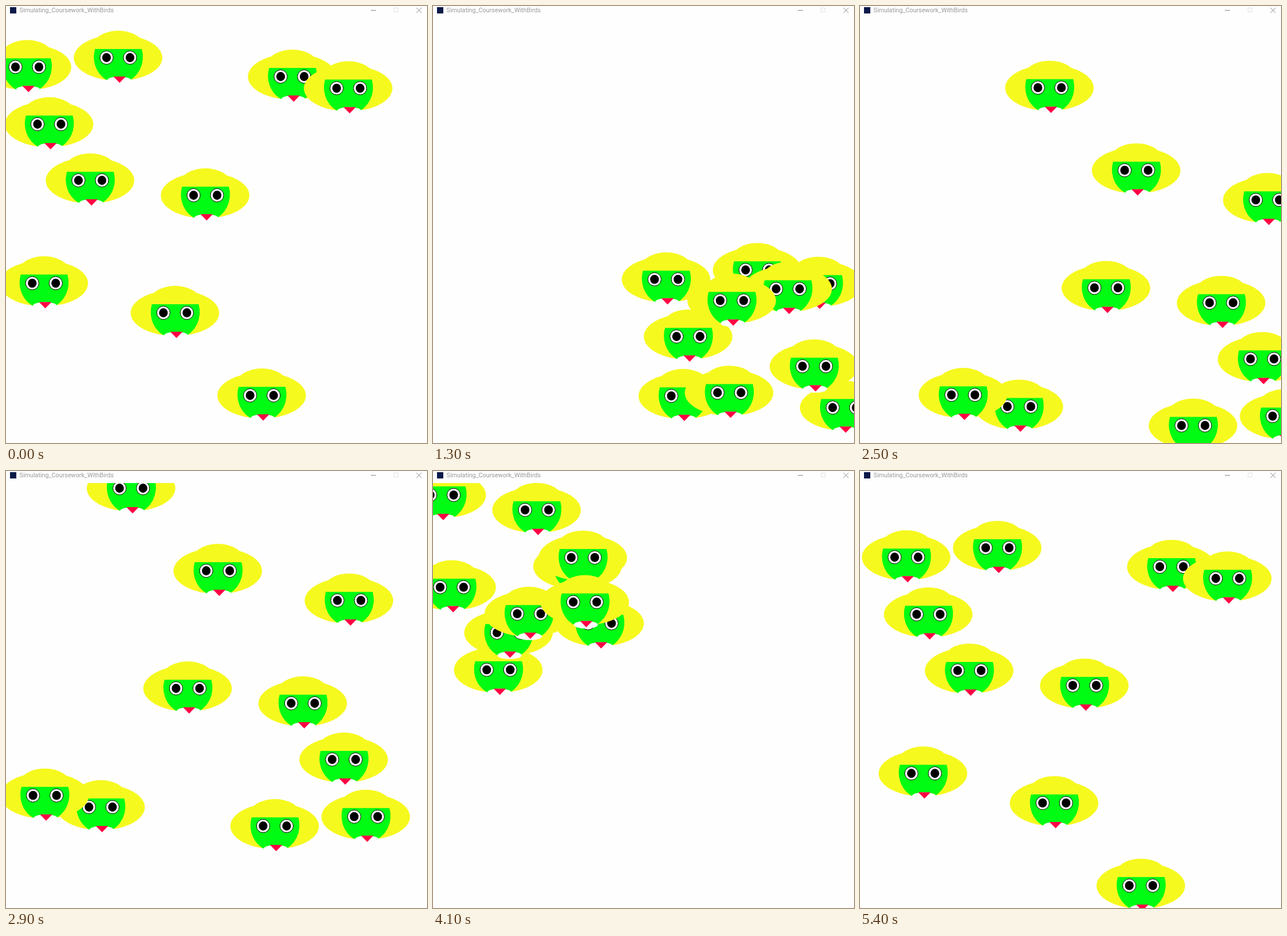
These frames come from a looping animation (735x762 px, 5500 ms). An HTML page with a canvas:

```html
<!DOCTYPE html>
<html>
<head>
<meta charset="utf-8">
<style>
  html, body { margin: 0; width: 100%; height: 100%; overflow: hidden; background: #fefefe; }
  canvas { display: block; }
</style>
</head>
<body>
<canvas id="stage" width="735" height="762"></canvas>
<script>
const ctx = document.getElementById('stage').getContext('2d');
const WIDTH = 735, HEIGHT = 762, BAR = 21;
const LOOP = 5500, STEP = 100;
const RIGHT = 744.9, FLOOR = 766.7, SPAN = 747;

// Where each bird starts, back to front; all head down and right.
const starts = [
  [446.7, 679], [75.5, 206], [66.3, 483.3], [147, 304], [348, 330],
  [295.3, 535], [37, 106.3], [196, 90], [500, 123], [597.7, 143.3]
];

// Pixels travelled by time t: a slight slowdown, then a catch-up.
function travelled(t) {
  const early = Math.min(t, 2500);
  const middle = Math.min(Math.max(t - 2500, 0), 1600);
  const late = Math.max(t - 4100, 0);
  return early * 0.2848 + middle * 0.281 + late * 0.2895;
}

// Triangle wave between wall - SPAN and wall.
function bounce(pos, wall) {
  const period = 2 * SPAN;
  const past = (pos - wall + period) % period;
  return wall - Math.min(past, period - past);
}

function ellipse(color, x, y, rx, ry, from = 0, to = 2 * Math.PI) {
  ctx.fillStyle = color;
  ctx.beginPath();
  ctx.ellipse(x, y, rx, ry, 0, from, to);
  ctx.fill();
}

function drawBird(x, y) {
  ctx.save();
  ctx.translate(x, y);
  ellipse('#f6f91e', -0.4, 0.3, 77.3, 40);
  ellipse('#f6f91e', 0, -19, 45, 28);
  const brow = Math.asin(0.3);
  ellipse('#00fb13', 0.2, -1.2, 42.8, 45.8, -brow, Math.PI + brow);
  ellipse('#fefefe', 1.5, 39.6, 21, 6.6);
  ctx.fillStyle = '#ff0044';
  ctx.beginPath();
  ctx.moveTo(-8.5, 33);
  ctx.lineTo(13, 33);
  ctx.lineTo(2.3, 44);
  ctx.fill();
  ctx.strokeStyle = '#000';
  for (const eye of [-20.5, 20.5]) {
    ellipse('#fff', eye, 0, 11.6, 11.6);
    ctx.stroke();
    ellipse('#000', eye, 0, 7.6, 7.9);
  }
  ctx.restore();
}

function line(x1, y1, x2, y2) {
  ctx.beginPath();
  ctx.moveTo(x1, y1);
  ctx.lineTo(x2, y2);
  ctx.stroke();
}

function drawTitleBar() {
  ctx.fillStyle = '#0b1a48';
  ctx.fillRect(7, 2, 11, 11);
  ctx.fillStyle = '#999';
  ctx.font = '10.8px Roboto, sans-serif';
  ctx.fillText('Simulating_Coursework_WithBirds', 23.5, 11);
  ctx.strokeStyle = '#e2e2e2';
  ctx.strokeRect(677.5, 3.5, 7, 7);
  ctx.strokeStyle = '#888';
  line(637, 7.5, 646, 7.5);
  line(716.5, 3, 725.5, 12);
  line(725.5, 3, 716.5, 12);
}

function draw(now) {
  const t = Math.floor((now % LOOP) / STEP) * STEP;
  const d = travelled(t);
  ctx.fillStyle = '#fefefe';
  ctx.fillRect(0, 0, WIDTH, HEIGHT);
  drawTitleBar();
  ctx.save();
  ctx.beginPath();
  ctx.rect(0, BAR, WIDTH, HEIGHT - BAR);
  ctx.clip();
  for (const [x, y] of starts) drawBird(bounce(x + d, RIGHT), bounce(y + d, FLOOR));
  ctx.restore();
  requestAnimationFrame(draw);
}

requestAnimationFrame(draw);
</script>
</body>
</html>
```
